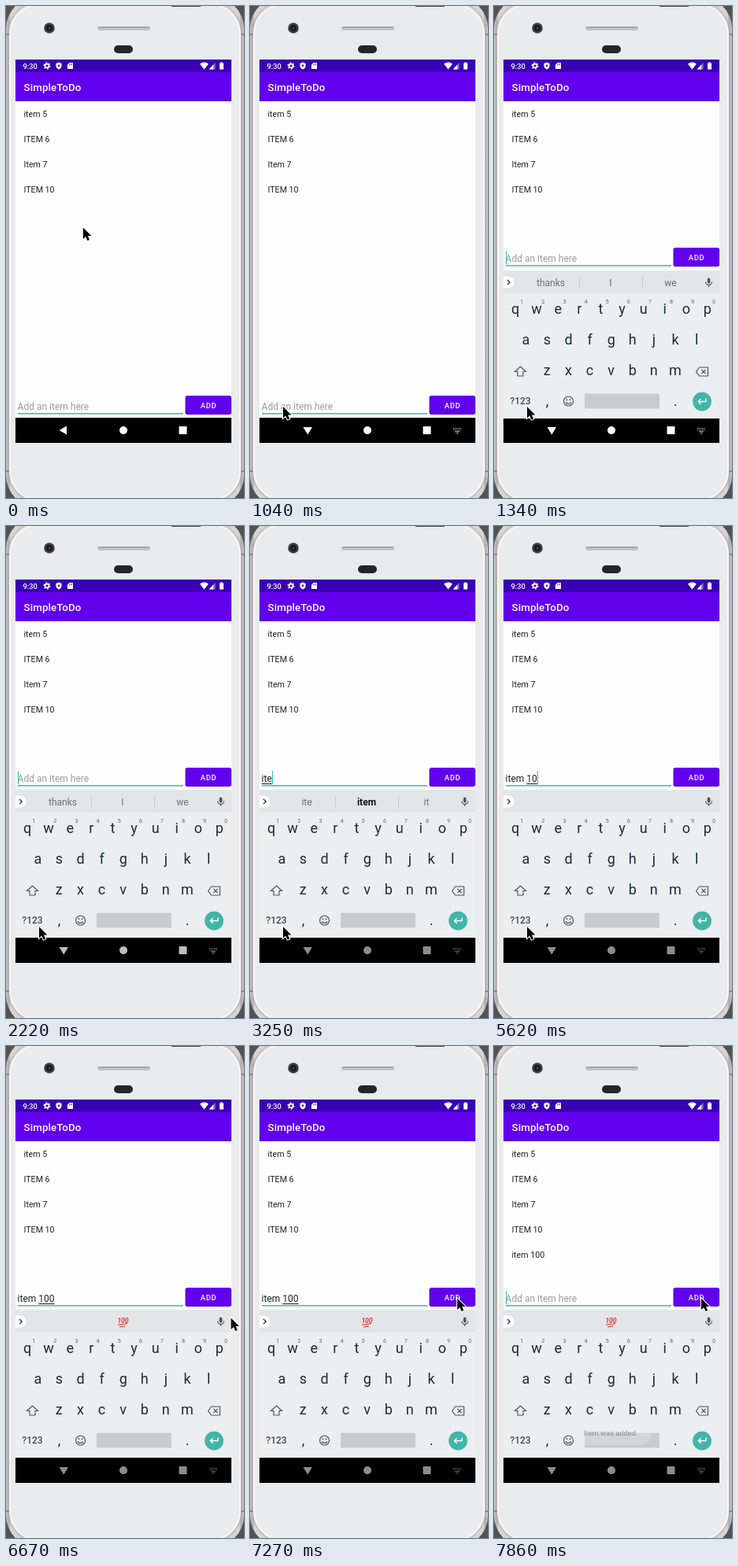
Animation of 302x625 px, one loop 8 s. Source, as an HTML page:

```html
<!DOCTYPE html>
<html lang="en">
<head>
<meta charset="utf-8">
<title>SimpleToDo</title>
<style>
html, body { margin: 0; width: 100%; height: 100%; overflow: hidden; background: #515452; }
body { position: relative; }
svg { position: absolute; left: 0; top: 0; display: block; }
text, #edit { font-family: Roboto, sans-serif; }
.mid { text-anchor: middle; }
.med { font-weight: 500; }
.list { font-size: 10.67px; fill: #212121; }
.keys { font-size: 18px; fill: #1c2d34; }
.hints { font-size: 7.4px; fill: #5f6d74; }
.word { font-size: 12px; fill: #667278; }
.word.best { font-weight: 700; fill: #111; }
.line { fill: none; stroke: #4a575d; stroke-width: 1.2; }
#edit { position: absolute; left: 14.6px; top: 502px; font-size: 12px; line-height: 14px; white-space: pre; color: #222; }
#edit.empty { color: #9c9c9c; }
#typing { text-decoration: underline; text-decoration-thickness: 1px; text-underline-offset: 1.5px; }
#caret { position: absolute; top: -3px; width: 1.5px; height: 17px; background: #1fc8b4; }
#mouse { fill: #000; stroke: #fff; stroke-width: 2; paint-order: stroke; }
</style>
</head>
<body>
<svg width="302" height="625" viewBox="0 0 302 625">
  <defs>
    <linearGradient id="metal">
      <stop offset="0" stop-color="#c9c4c4"/><stop offset=".012" stop-color="#b3adad"/>
      <stop offset=".02" stop-color="#d9d5d5"/><stop offset=".98" stop-color="#d9d5d5"/>
      <stop offset=".988" stop-color="#b3adad"/><stop offset="1" stop-color="#c9c4c4"/>
    </linearGradient>
  </defs>

  <!-- phone body -->
  <rect x="0" y="-11.5" width="302" height="648" rx="40" fill="url(#metal)"/>
  <rect x="3" y="-6" width="296" height="637" rx="40" fill="none" stroke="#b0abab"/>
  <rect x="5" y="-2" width="292" height="630" rx="38" fill="#e9ebec" stroke="#f8f8f8" stroke-width="2"/>
  <path d="M0 36h4M0 591h4M298 36h4M298 591h4" stroke="#8d8888" stroke-width="2"/>
  <rect x="210" y="0" width="37" height="1" fill="#444"/>
  <circle cx="55" cy="28" r="6.8" fill="#3c3f41"/>
  <circle cx="55" cy="28" r="4" fill="#17191b"/>
  <circle cx="55" cy="28" r="1.6" fill="#394a58"/>
  <rect x="116" y="26" width="67" height="5" rx="2.5" fill="#c2c3c4"/>
  <rect x="117" y="26" width="65" height="2" rx="1" fill="#a6a7a8"/>
  <rect x="137" y="50" width="24" height="10" rx="5" fill="#242628"/>

  <!-- app -->
  <rect x="12" y="68" width="274" height="487" fill="#fefefe"/>
  <rect x="12" y="68" width="274" height="16" fill="#3a00b4"/>
  <rect x="12" y="84" width="274" height="37" fill="#6200ee"/>
  <g fill="#fff">
    <text class="med" x="21.5" y="79.6" font-size="9.3">9:30</text>
    <circle cx="52" cy="76" r="2.4" fill="none" stroke="#fff" stroke-width="1.8"/>
    <circle cx="52" cy="76" r="3.8" fill="none" stroke="#fff" stroke-width="1.4" stroke-dasharray="1.9 2.08"/>
    <path d="M67 71.6l3.6 1.4v2.8q0 3.2-3.6 4.8q-3.6-1.6-3.6-4.8v-2.8z"/>
    <circle cx="67" cy="75.8" r="1.3" fill="#3a00b4"/>
    <path d="M80.5 72h4.5v8h-7v-5.5z"/>
    <path d="M80.5 73.5v2M82 73v2.5M83.5 73v2.5" stroke="#3a00b4" stroke-width=".6"/>
    <path d="M246 73.5q5.5-4 11 0l-5.5 7z"/>
    <path d="M265.5 72v8.5h-8z" opacity=".45"/><path d="M263 74.7v5.8h-5.5z"/>
    <path d="M272.3 71.5h2.4v1h1.3v8h-5v-8h1.3z"/>
    <text class="med" x="22.5" y="108" font-size="13.33" letter-spacing=".12">SimpleToDo</text>
  </g>
  <g id="list"></g>

  <!-- input row -->
  <g id="row">
    <rect x="15" y="517" width="210" height="1.6" fill="#35c4b3"/>
    <rect x="227.5" y="495.5" width="58.5" height="24" rx="3" fill="#000" opacity=".14"/>
    <rect x="227.5" y="495" width="58.5" height="24" rx="2.7" fill="#6200ee"/>
    <rect id="press" x="227.5" y="495" width="58.5" height="24" rx="2.7" fill="#fff" opacity="0"/>
    <text class="mid med" x="257.1" y="510.8" font-size="9.33" letter-spacing=".83" fill="#fff">ADD</text>
  </g>

  <!-- navigation bar -->
  <rect x="12" y="523" width="274" height="32" fill="#000"/>
  <g id="nav" fill="#fff">
    <path id="back" d="M67.5 539l9.5-5.5v11z"/>
    <path id="down" d="M67.5 535h11.5l-5.75 9.5z"/>
    <circle cx="149" cy="539" r="5"/>
    <rect x="219.5" y="534" width="10" height="10" rx=".8"/>
    <g id="switch" fill="none" stroke="#fff" opacity=".85">
      <path d="M258 536.5h10M258 538.7h10" stroke-dasharray="1.2 .96"/>
      <path d="M260.2 540.8h5.6M262 543h2"/>
    </g>
  </g>

  <!-- keyboard -->
  <g id="board">
    <rect x="12" y="335" width="274" height="188" fill="#ebeff1"/>
    <rect x="12" y="335" width="274" height="29" fill="#e2e6e8"/>
    <path d="M12 342.5h6a7.5 7.5 0 0 1 0 15h-6z" fill="#fff"/>
    <path class="line" d="M17 346.8l3.2 3.2l-3.2 3.2" style="stroke:#222"/>
    <rect x="270.8" y="344.5" width="3.6" height="7" rx="1.8" fill="#4a575d"/>
    <path class="line" d="M268.7 349.5a3.9 3.9 0 0 0 7.8 0M272.6 353.5v2.5"/>
    <path id="bars" d="M108.5 343v14.5M188.5 343v14.5" stroke="#c6cccf"/>
    <g id="words"></g>
    <g id="hundred" fill="#e0363b" stroke="#e0363b">
      <text class="mid" x="148.5" y="351.5" font-size="8.5" font-weight="700" font-style="italic" stroke="none">100</text>
      <path d="M142 354.3l12-1.5M144 357l7-1" stroke-width="1.1"/>
    </g>
    <g id="keys"></g>
    <path class="line" d="M33.5 457l7 6.5h-3.5v5.5h-7v-5.5h-3.5z"/>
    <path class="line" d="M256.5 463.5l4-5.5h11v11h-11zM263.3 460.8l5.4 5.4M268.7 460.8l-5.4 5.4"/>
    <text class="mid med" x="33.5" y="505.3" font-size="12" fill="#3f4d53">?123</text>
    <circle class="line" cx="94.5" cy="501" r="6"/>
    <path class="line" d="M91 502.5q3.5 4 7 0"/>
    <circle cx="92.4" cy="499.3" r="1" fill="#4a575d"/><circle cx="96.6" cy="499.3" r="1" fill="#4a575d"/>
    <rect x="115" y="491.5" width="95" height="19" rx="1.5" fill="#c7cccf"/>
    <circle cx="264" cy="501.5" r="11.9" fill="#41b5a7"/>
    <path d="M269 497.5v4h-9.5M262.5 498.3l-3.2 3.2l3.2 3.2" fill="none" stroke="#fff" stroke-width="1.4"/>
  </g>
  <g id="toast" opacity="0">
    <rect x="98" y="476" width="102" height="31" rx="15.5" fill="#eef0f1" opacity=".65"/>
    <text x="114" y="494.5" font-size="9.33" fill="#333">Item was added.</text>
  </g>
</svg>

<div id="edit"><span id="done"></span><span id="typing"></span><span id="caret"></span></div>

<svg width="302" height="625" viewBox="0 0 302 625">
  <path id="mouse" d="M0 0V14.5L3.3 11.4L5.5 16.5L8.2 15.4L6 10.4H10.5Z"/>
</svg>

<script>
const LOOP = 8000;
const $ = id => document.getElementById(id);

function addText(parent, text, x, y, cls) {
  const el = document.createElementNS('http://www.w3.org/2000/svg', 'text');
  el.setAttribute('x', x);
  el.setAttribute('y', y);
  el.setAttribute('class', cls);
  el.textContent = text;
  return parent.appendChild(el);
}

const items = ['item 5', 'ITEM 6', 'Item 7', 'ITEM 10', 'item 100']
  .map((name, i) => addText($('list'), name, 22.5, 141.3 + 32 * i, 'list'));

[['qwertyuiop', 27], ['asdfghjkl', 40.3], ['zxcvbnm', 67.3]].forEach(([row, x], r) =>
  [...row].forEach((c, i) => addText($('keys'), c, x + 27.1 * i, 389.5 + 39 * r, 'keys mid')));
[...'1234567890'].forEach((c, i) => addText($('keys'), c, 35.3 + 27.1 * i, 376.7, 'hints mid'));
addText($('board'), ',', 67.5, 506.5, 'keys mid');
addText($('board'), '.', 230, 506.5, 'keys mid');

const words = [72, 148, 224].map(x => addText($('words'), '', x, 354.5, 'word mid'));

// Step tracks: [start ms, value]. A bar marks where the underlined word starts.
const typed = [[0, ''], [2950, '|i'], [3100, '|it'], [3250, '|ite'], [3690, '|item'], [3840, 'item '],
  [5040, 'item 1'], [5620, 'item |10'], [5770, 'item |100'], [7710, '']];
// A star marks the bold suggestion.
const offers = [[0, 'thanks I we'], [2950, 'in *I is'], [3100, 'is *it in'], [3250, 'ite *item it'],
  [3690, 'time *item items'], [3840, 'and is I'], [5040, '']];
const blink = [[0, 0], [1340, 1], [1780, 0], [2220, 1], [2660, 0], [2950, 1], [4440, 0], [4890, 1],
  [6220, 0], [6820, 1], [7260, 0], [7710, 1]];
const mouse = [[0, [97.8, 281.5]], [150, [91, 312]], [290, [59, 440]], [440, [41, 509]], [740, [42, 509]],
  [6220, [150, 445]], [6370, [269, 358]], [6670, [285.5, 345.5]], [6820, [277, 335]], [6970, [263, 320.5]]];
const press = [[0, 0], [7410, .1], [7560, .22], [7710, .12], [7860, 0]];
const toast = [[0, 0], [7710, .15], [7860, .45]];

const at = (track, t) => track.findLast(([start]) => start <= t)[1];
const show = (el, on) => { el.style.display = on ? '' : 'none'; };

function draw(t) {
  const open = t >= 1340;
  const lift = open ? -188 : 0;
  $('row').setAttribute('transform', `translate(0 ${lift})`);
  $('edit').style.transform = `translateY(${lift}px)`;
  show($('board'), open);
  $('board').setAttribute('transform', `translate(0 ${t < 1480 ? 1 : 0})`);

  const text = at(typed, t);
  const [done, typing = ''] = text.split('|');
  $('edit').className = text ? '' : 'empty';
  $('done').textContent = text ? done : 'Add an item here';
  $('typing').textContent = typing;
  $('caret').style.left = text ? '' : '0';
  show($('caret'), at(blink, t));

  const offer = at(offers, t).split(' ');
  words.forEach((el, i) => {
    const word = offer[i] || '';
    el.textContent = word.replace('*', '');
    el.classList.toggle('best', word[0] === '*');
  });
  show($('bars'), offer.length > 1);
  show($('hundred'), t >= 5770);

  show(items[4], t >= 7860);
  $('press').setAttribute('opacity', at(press, t));
  $('toast').setAttribute('opacity', at(toast, t));

  const ready = t >= 1040;
  show($('back'), !ready);
  show($('down'), ready);
  show($('switch'), ready);
  const dim = Math.min(1, Math.max(0, (t - 1640) / 1020));
  $('nav').setAttribute('opacity', 1 - .45 * dim);

  $('mouse').setAttribute('transform', `translate(${at(mouse, t)})`);
}

const began = performance.now();
function tick() {
  draw((performance.now() - began) % LOOP);
  requestAnimationFrame(tick);
}
tick();
</script>
</body>
</html>
```
